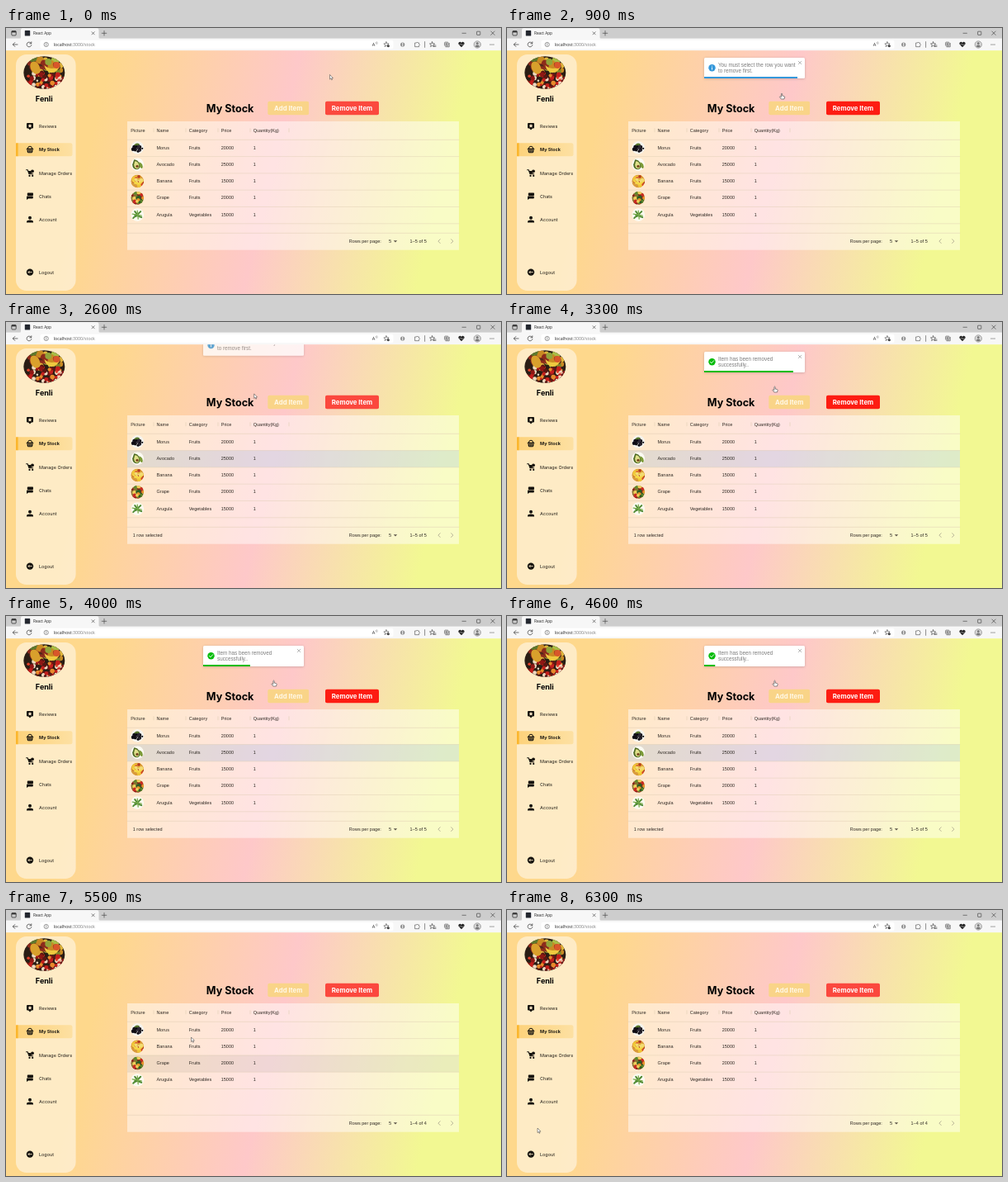
Recreate the animation shown at these times as an HTML page. Size 600 px wide and 322 px high, loop 6400 ms.

```html
<!DOCTYPE html>
<html lang="en">
<head>
<meta charset="utf-8">
<title>My Stock</title>
<style>
  html, body { margin: 0; width: 100%; height: 100%; overflow: hidden; }
  svg { display: block; width: 600px; height: 322px; }
  text { white-space: pre; }
  .inter { font-family: Inter, sans-serif; }
  .grid { font: 5.47px "Liberation Sans", Arial, sans-serif; letter-spacing: .05px; fill: #2b2620; }
  .toast { font: 6.3px "Liberation Sans", Arial, sans-serif; fill: #7c7c7c; }
  .chrome { font-family: "Open Sans", sans-serif; fill: #222; }
  .nav { font: 5.47px Inter, sans-serif; fill: #1d1a14; }
  .bold { font-weight: 700; }
  .line { fill: none; stroke-linecap: round; stroke-linejoin: round; }
</style>
</head>
<body>
<svg id="stage" viewBox="0 0 600 322" xmlns="http://www.w3.org/2000/svg"></svg>
<script>
const LOOP = 6400, STEP = 100;
const ROW_TOP = 135.3, ROW_H = 20.3;
const REMOVE = { x: 387, y: 88.7, w: 65, h: 16.6 };
const POINTER_SCALE = 0.8; // pointer is drawn at 80% of its true position
const RELOAD = 5100, SELECT = 2200;

const text = (x, y, s, cls, extra = '') => `<text x="${x}" y="${y}" class="${cls}" ${extra}>${s}</text>`;
const rect = (x, y, w, h, fill, r = 0, extra = '') =>
  `<rect x="${x}" y="${y}" width="${w}" height="${h}" rx="${r}" fill="${fill}" ${extra}/>`;
const dot = (x, y, r, fill, extra = '') => `<circle cx="${x}" cy="${y}" r="${r}" fill="${fill}" ${extra}/>`;
const shape = (d, fill) => `<path d="${d}" fill="${fill}"/>`;
const line = (d, stroke, w = 0.7) => `<path class="line" d="${d}" stroke="${stroke}" stroke-width="${w}"/>`;
const at = (x, y, s) => `<g transform="translate(${x} ${y})">${s}</g>`;

function seeded(seed) {
  return () => (seed = (seed * 16807) % 2147483647) / 2147483647;
}

// Loose heap of round fruit inside an ellipse
function heap(seed, n, rx, ry, size, colors) {
  const rnd = seeded(seed);
  let s = '';
  for (let i = 0; i < n; i++) {
    const a = rnd() * 6.283, d = Math.sqrt(rnd());
    s += dot((Math.cos(a) * d * rx).toFixed(1), (Math.sin(a) * d * ry).toFixed(1),
      (size * (0.6 + rnd() * 0.7)).toFixed(1), colors[Math.floor(rnd() * colors.length)]);
  }
  return s;
}

function avatar() {
  return at(46.3, 54, `<g clip-path="url(#oval)">
    ${rect(-26, -21, 52, 42, '#2a1d14')}
    ${at(0, -6, heap(41, 28, 24, 10, 4, ['#7d8a2a', '#c98a23', '#e0b53a', '#4d2a18', '#8c2b1c', '#a9bd45']))}
    ${at(0, 9, heap(77, 70, 25, 10, 2.2, ['#c41f1c', '#e2402a', '#8e1714', '#f0d9c0', '#e88a2c', '#5a1612']))}
    <ellipse cx="-11" cy="-6" rx="5.5" ry="8" fill="#d9a02c" transform="rotate(-25 -11 -6)"/>
    ${shape('M-16-13l-6-5 6 1 0-5 4 4 5-3-3 7z', '#5f7a2c')}
    ${shape('M0-9q9 8 20 0q-5 10-12 9q-6-1-8-9z', '#efc93f')}
    ${dot(15, -9, 4, '#d8572a')}${dot(5, -13, 4, '#93a53a')}</g>`);
}

const photos = {
  Morus: dot(0, 0, 8, '#f7f5ee') + at(0, 1, heap(9, 26, 6, 3.6, 1.7, ['#17141c', '#2d2733', '#0c0a10'])) +
    shape('M-4-3q3-4 7-1q-3 2-7 1z', '#55742c'),
  Avocado: dot(0, 0, 8, '#fbfaf2') + shape('M-4-6q5 0 7 6q1 5-3 6q-6 0-6-6z', '#4e6a22') +
    shape('M-3-4q4 0 5 5q0 4-2 4q-4 0-4-5z', '#dfe08a') + dot(-.2, 2.2, 1.7, '#7a4a22') +
    shape('M2-3q6 2 4 8q-4-1-4-8z', '#7b9a36'),
  Banana: dot(0, 0, 8, '#d99a3a') + heap(23, 22, 7, 7, 2, ['#d8402a', '#efc437', '#f3dc72', '#b53a22']) +
    shape('M-6-3q5 7 13 3q-4 7-10 3q-4-3-3-6z', '#f6d743'),
  Grape: dot(0, 0, 8, '#8a7030') + heap(58, 30, 7, 7, 2, ['#c92b22', '#5c8a2c', '#e8962c', '#f0cf5a', '#8e1d1a', '#2f5a22']),
  Arugula: dot(0, 0, 8, '#fbfaf0') + line('M-5 4L-1 0M-3-4L2 2M4-4L-2 2M5 3L-3 0', '#4f8a33', 2) +
    line('M-6-1L5 1M0-5L1 5', '#79ab4c', 1.3)
};

const stock = [
  ['Morus', 'Fruits', 20000], ['Avocado', 'Fruits', 25000], ['Banana', 'Fruits', 15000],
  ['Grape', 'Fruits', 20000], ['Arugula', 'Vegetables', 15000]
];

function stockRow([name, kind, price], i) {
  const cells = [[182.5, name], [221.7, kind], [260.7, price], [299.7, 1]];
  return `<g id="row${i}">${rect(147, 0, 402, ROW_H, 'none', 0, `id="fill${i}"`)}
    ${at(159.2, 9.6, `<g clip-path="url(#disc)">${photos[name]}</g>`)}
    ${cells.map(([x, s]) => text(x, 11.3, s, 'grid')).join('')}
    ${line(`M147 ${ROW_H}H549`, '#d8c8ac', .4)}</g>`;
}

function tableHead() {
  const heads = [[151.2, 'Picture'], [182.5, 'Name'], [221.7, 'Category'], [260.7, 'Price'], [299.7, 'Quantity(Kg)']];
  return heads.map(([x, s]) => text(x, 125.8, s, 'grid')).join('') +
    [179, 218, 257, 296, 343].map(x => line(`M${x} 121.8v4`, '#ddcdb2', .6)).join('') +
    line(`M147 ${ROW_TOP}H549M147 248.3H549`, '#dccbb0', .5);
}

function tableFoot() {
  return text(153.7, 260, '1 row selected', 'grid', 'id="picked"') +
    text(415.8, 260, 'Rows per page:', 'grid') + text(464, 260, '5', 'grid') +
    shape('M469.8 257.2h4.4l-2.2 2.3z', '#5c5548') + text(489.6, 260, '', 'grid', 'id="count"') +
    line('M526.2 255.7l-2.3 2.4 2.3 2.4M539.6 255.7l2.3 2.4-2.3 2.4', '#a9a48c', .8);
}

function sidebar() {
  const ink = '#14110c', paper = '#fdeacb';
  const items = [
    ['Reviews', 119, rect(-4, -4, 8, 6.6, ink, 1) + shape('M-2.2 2h4.4L0 4.6z', ink) +
      shape('M0-3l.8 1.5 1.6.2-1.2 1.1.3 1.6L0 .7l-1.5.7.3-1.6-1.2-1.1 1.6-.2z', paper)],
    ['My Stock', 147.3, shape('M-4.2-1.5H4.2V0H-4.2zM-3.7.4H3.7L3 3.3Q2.8 4 2 4H-2Q-2.8 4-3 3.3z', ink) +
      line('M-2.6-1.5q0-2.6 2.6-2.6t2.6 2.6', ink, 1) + line('M-1.5 1.4v1.4M0 1.4v1.4M1.5 1.4v1.4', '#fbdc98', .5)],
    ['Manage Orders', 175.5, line('M-4.4-3.8h1.6l1.8 5h4.6', ink, 1.1) + shape('M-2.4-2.4H1L2.6.8H-1z', ink) +
      dot(-.5, 3.4, 1.1, ink) + dot(3.2, 3.4, 1.1, ink) + dot(3, -2.2, 1.9, ink)],
    ['Chats', 203.6, rect(-3.2, -4, 7.2, 3.4, ink, .8) + rect(-4, 0, 7.8, 3, ink, .8) + shape('M-4 1v3.4l2-1.6z', ink)],
    ['Account', 231.6, dot(0, -1.8, 2, ink) + shape('M-4 3.8V2.6Q-3.6.8 0 .8T4 2.6v1.2z', ink)],
    ['Logout', 295.6, dot(0, 0, 4.2, ink) + line('M2.4 0H-2M-.6-1.4L-2 0l1.4 1.4', paper, .8)]
  ];
  return rect(12, 32, 72.6, 286, '#fff', 13, 'fill-opacity=".5"') + avatar() +
    text(46.3, 88.7, 'Fenli', 'inter bold', 'font-size="9" text-anchor="middle"') +
    rect(12, 139.3, 68.5, 16, 'url(#active)', 2.5) + rect(12, 139.3, 2.6, 16, '#fbb62d') +
    items.map(([s, y, icon]) => at(29, y, icon) +
      text(40, y + 2.1, s, 'nav' + (s === 'My Stock' ? ' bold' : ''))).join('');
}

function browser() {
  const k = '#333', star = 'M0-3l.9 2 2.2.2-1.7 1.4.6 2.2L0 1.6l-2 1.2.6-2.2-1.7-1.4L-.9-1z';
  return rect(0, 0, 600, 13.2, '#cdcdcd') + rect(0, 12.6, 600, 14.6, '#f7f7f7') +
    shape('M16 13.2q2 0 2-2V2.5q0-2.2 2.2-2.2h90q2.3 0 2.3 2.2v8.7q0 2 2 2z', '#f7f7f7') +
    at(9.5, 6.3, rect(-2.7, -2.7, 5.4, 5.4, 'none', 1, `stroke="${k}" stroke-width=".8"`) + rect(-2.7, -2.7, 5.4, 1.8, k)) +
    rect(22.8, 3.1, 6.4, 6.4, '#23272f', .6) + text(33, 8.2, 'React App', 'chrome', 'font-size="4.7"') +
    line('M104 4.7l3.2 3.2M107.2 4.7l-3.2 3.2M116.2 6.3h5.6M119 3.5v5.6', k, .6) +
    line('M553 6.3h4.4M587.8 4l4.4 4.4M592.2 4l-4.4 4.4', k, .6) +
    rect(570.6, 4.2, 4.2, 4.2, 'none', .5, `stroke="${k}" stroke-width=".6"`) +
    rect(41.5, 14.8, 428, 10.4, '#fff', 2.5) +
    line('M14 20H8.4M10.8 17.5L8.3 20l2.5 2.5', k) +
    line('M30.6 18.6a2.9 2.9 0 1 0 .3 2M30.8 16.8v2h-2', k) +
    dot(48.7, 20, 2.6, 'none', 'stroke="#555" stroke-width=".6"') + line('M48.7 19.8v1.3M48.7 18.6v.1', '#555', .6) +
    text(57.7, 21.9, 'localhost<tspan fill="#777">:3000/stock</tspan>', 'chrome', 'font-size="5.25"') +
    text(443.8, 22, 'A', 'chrome', 'font-size="5.6"') + line('M448.4 17.2q1 .8 0 1.8M449.7 16.6q1.4 1.3 0 3', '#555', .4) +
    at(461, 19.8, line(star, '#444', .6) + dot(2.4, 2, 1.5, '#444')) +
    dot(480.7, 20, 2.6, '#8b8b8b') + rect(480, 18, 1.4, 4, '#dcdcdc') +
    line('M496 18h1.6q.8-2 1.8 0h1.2v1.4q2 .7 0 1.8v1.5H496zM507.6 16.6v6.8', '#444', .6) +
    at(516.6, 19.8, line(star, k, .6)) + line('M518.8 21h2.2M518.8 22.4h2.2', k, .6) +
    rect(531.6, 17.2, 4.4, 4.4, 'none', .8, `stroke="${k}" stroke-width=".6"`) +
    line('M533 22.8h4.2v-4.4M532.6 19.4h2.4M533.8 18.2v2.4', k, .6) +
    shape('M552 23.2l-3.2-3.2q-1.2-2.6 1-3.1 1.4-.2 2.2 1.1.8-1.3 2.2-1.1 2.2.5 1 3.1z', '#1f1f1f') +
    line('M549.4 20h1.5l.8-1 .9 1.9.7-.9h1.4', '#fff', .4) +
    dot(571.3, 20, 4.2, '#d8d8d8', 'stroke="#666" stroke-width=".5"') +
    dot(571.3, 18.7, 1.4, '#777') + shape('M568.7 22.6q.4-2 2.6-2t2.6 2q-2.6 1.6-5.2 0z', '#777') +
    [587, 589, 591].map(x => dot(x, 20, .55, k)).join('');
}

function toast(id, color, mark, a, b) {
  return `<g id="${id}">${rect(239, 36, 122, 25, '#fff', 1.6, 'filter="url(#shadow)"')}
    ${dot(248.5, 48.2, 4.2, color)}${line(mark, '#fff', .9)}
    ${text(256, 47.2, a, 'toast')}${text(256, 54.4, b, 'toast')}
    ${line('M353.2 40.2l3.6 3.6M356.8 40.2l-3.6 3.6', '#8a8a8a', .6)}
    ${rect(239, 59, 122, 2, color, 0, `id="${id}Bar"`)}</g>`;
}

const stage = document.getElementById('stage');
stage.innerHTML = `<defs>
  <linearGradient id="page" gradientUnits="userSpaceOnUse" x1="0" y1="0" x2="583" y2="140">
    <stop offset=".22" stop-color="#fed88c"/><stop offset=".59" stop-color="#fec8c9"/><stop offset=".93" stop-color="#f2f892"/>
  </linearGradient>
  <linearGradient id="active"><stop offset="0" stop-color="#fdd27a"/><stop offset="1" stop-color="#fde0a2"/></linearGradient>
  <clipPath id="oval"><ellipse rx="25" ry="19.8"/></clipPath>
  <clipPath id="disc"><circle r="7.9"/></clipPath>
  <filter id="shadow" x="-10%" y="-30%" width="120%" height="170%">
    <feDropShadow dx="0" dy=".6" stdDeviation="1.6" flood-color="#000" flood-opacity=".2"/></filter>
  </defs>
  ${rect(0, 27, 600, 295, 'url(#page)')}
  ${sidebar()}
  ${text(242.8, 101.7, 'My Stock', 'inter bold', 'font-size="12.6"')}
  ${rect(317.3, 88.7, 49.8, 16.6, '#f9d488', 2)}
  ${text(342.2, 99.9, 'Add Item', 'inter bold', 'font-size="7.8" fill="#fff8e6" text-anchor="middle"')}
  ${rect(REMOVE.x, REMOVE.y, REMOVE.w, REMOVE.h, '#fb483e', 2, 'id="remove"')}
  ${text(419.5, 99.9, 'Remove Item', 'inter bold', 'font-size="7.8" fill="#fff" text-anchor="middle"')}
  ${rect(147, 113, 402, 155.7, '#fff', 0, 'fill-opacity=".48"')}
  ${stock.map(stockRow).join('')}
  ${tableHead()}${tableFoot()}
  ${toast('info', '#3498db', 'M248.5 47.9v2.3M248.5 46v.1', 'You must select the row you want', 'to remove first.')}
  ${toast('done', '#07bc0c', 'M246.4 48.3l1.5 1.6 2.8-3.2', 'Item has been removed', 'successfully..')}
  ${browser()}
  <path id="arrow" d="M0 0V5.6L1.3 4.4 2.2 6.4 3 6 2.2 4.1H3.9Z" fill="#fff" stroke="#333" stroke-width=".5"/>
  <path id="hand" d="M-.6.6Q0-.4.6.6V3l2.4.6q.8.3.6 1.2L3 7H-.6L-2.6 4.4q.4-1 1.2-.4l.8.7Z" fill="#fff" stroke="#333" stroke-width=".55"/>`;

const el = id => document.getElementById(id);
const show = (id, on) => el(id).setAttribute('display', on ? 'inline' : 'none');
const move = (id, x, y) => el(id).setAttribute('transform', `translate(${x} ${y})`);
const smooth = p => p * p * (3 - 2 * p);

const path = [
  [0, 392.5, 56.5], [100, 392.5, 56.5], [400, 333, 79], [1400, 333, 79], [2000, 172, 135], [2300, 172, 135],
  [2700, 324.5, 78], [4650, 324.5, 78], [4950, 22, 17], [5100, 22, 17], [5500, 224.5, 154],
  [5700, 224.5, 154], [6300, 37, 264], [6400, 37, 264]
];

// Piecewise interpolation over [time, ...values] keys
function track(keys, t, ease = p => p) {
  let i = 0;
  while (i < keys.length - 2 && t >= keys[i + 1][0]) i++;
  const [a, b] = [keys[i], keys[i + 1]];
  const p = ease(Math.min(1, Math.max(0, (t - a[0]) / (b[0] - a[0]))));
  return a.slice(1).map((v, k) => v + (b[k + 1] - v) * p);
}

const LIFE = 1675, ENTER = 250, EXIT = 240;
const dropIn = [[0, -90, 0], [.6, 10, 1], [.75, -4, 1], [.9, 2, 1], [1, 0, 1]];
const flyOut = [[0, 0, 1], [.2, -4, 1], [.45, 8, 1], [1, -120, 0]];

// start is the moment the countdown bar begins to shrink
function drawToast(id, start, t) {
  const age = t - start;
  show(id, age >= -ENTER && age < LIFE + EXIT);
  const [dy, alpha] = age < 0 ? track(dropIn, 1 + age / ENTER, smooth)
    : age < LIFE ? [0, 1] : track(flyOut, (age - LIFE) / EXIT, smooth);
  move(id, 0, dy);
  el(id).setAttribute('opacity', alpha);
  el(id + 'Bar').setAttribute('width', 122 * Math.min(1, Math.max(0, 1 - age / LIFE)));
}

function draw(t) {
  const [x, y] = track(path, t, smooth);
  const px = x / POINTER_SCALE, py = y / POINTER_SCALE;
  const onRemove = px > REMOVE.x && px < REMOVE.x + REMOVE.w && py > REMOVE.y && py < REMOVE.y + REMOVE.h;
  show('arrow', !onRemove);
  show('hand', onRemove);
  move('arrow', x, y);
  move('hand', x, y);
  el('remove').setAttribute('fill', onRemove ? '#fd1c12' : '#fb483e');

  const removed = t >= RELOAD, picked = t >= SELECT && !removed;
  const hovered = px > 147 && px < 549 ? Math.floor((py - ROW_TOP) / ROW_H) : -1;
  stock.forEach((_, i) => {
    const slot = removed && i > 1 ? i - 1 : i;
    show('row' + i, !(removed && i === 1));
    move('row' + i, 0, ROW_TOP + slot * ROW_H);
    el('fill' + i).setAttribute('fill', picked && i === 1 ? 'rgba(25,118,210,.12)'
      : slot === hovered ? 'rgba(0,0,0,.06)' : 'none');
  });
  show('picked', picked);
  el('count').textContent = removed ? '1–4 of 4' : '1–5 of 5';
  drawToast('info', 777, t);
  drawToast('done', 3107, t);
}

function tick() {
  const t = performance.now() % LOOP;
  draw(Math.floor(t / STEP) * STEP);
  requestAnimationFrame(tick);
}
tick();
</script>
</body>
</html>
```
